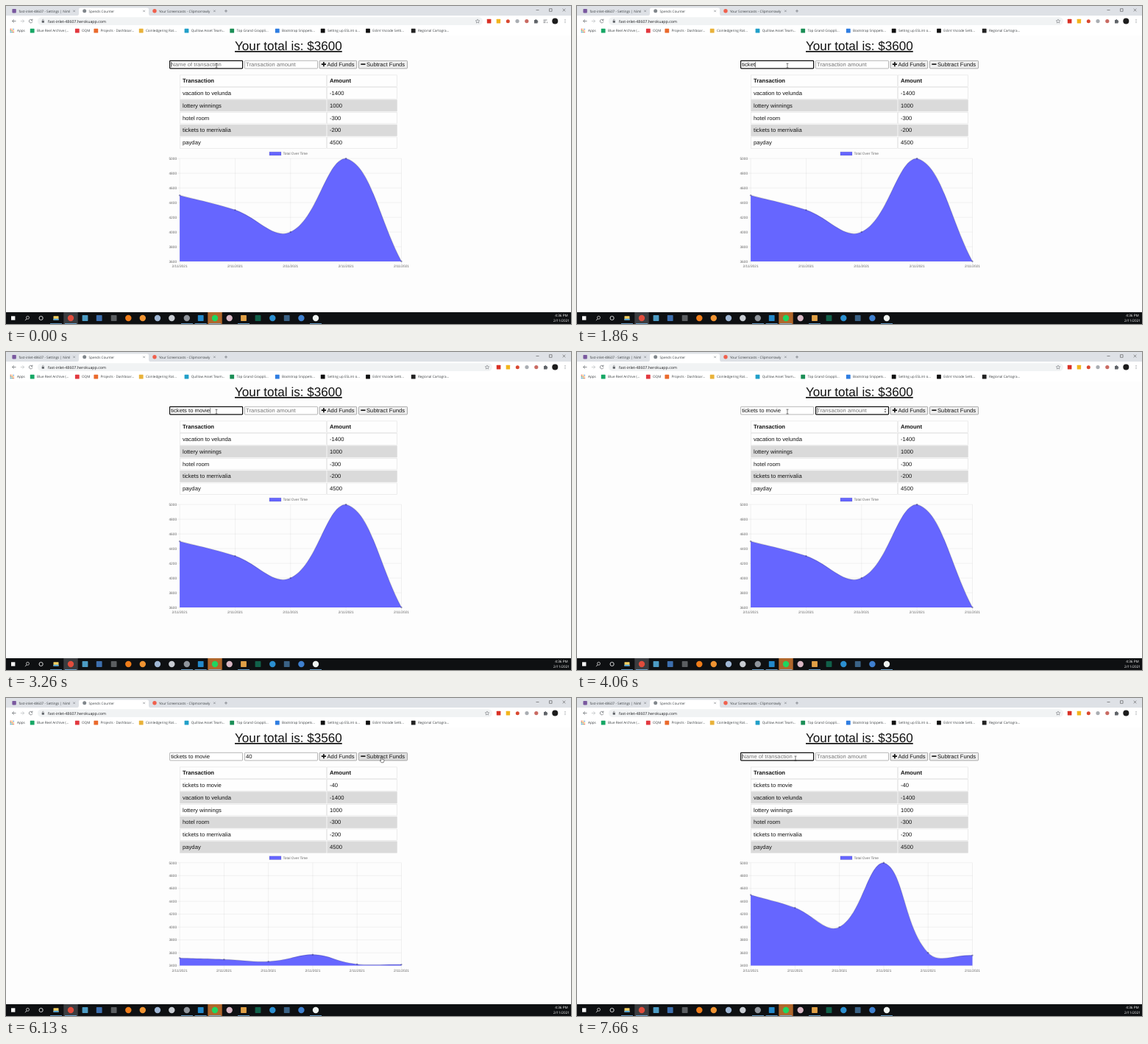
Animation, 768 px wide and 432 px high, one loop 8000 ms. Source, as an HTML page:

```html
<!DOCTYPE html>
<html lang="en">
<head>
<meta charset="utf-8">
<title>Spends Counter</title>
<style>
  html, body { margin: 0; width: 100%; height: 100%; overflow: hidden; background: #fdfdfd; }
  svg { display: block; width: 768px; height: 432px; }
  text { font: 7.68px "Liberation Sans", Arial, sans-serif; white-space: pre; text-rendering: geometricPrecision; fill: #151515; }
  .ui text { font: 4.65px "Open Sans", "Noto Sans", sans-serif; fill: #3c4043; }
  .ui .url { font-size: 5.3px; fill: #202124; }
  .ui .clock { fill: #fff; text-anchor: middle; }
  .title { font-size: 17.1px; text-anchor: middle; text-decoration: underline; fill: #111; }
  .head { font-weight: bold; }
  .chart text { font-size: 4.8px; fill: #666; }
  .hint { fill: #757575; }
</style>
</head>
<body>
<svg id="stage" viewBox="0 0 768 432"></svg>
<script>
const LOOP = 8000;
const stage = document.getElementById('stage');

// ---- drawing helpers ----
function el(parent, name, attrs = {}) {
  const node = document.createElementNS('http://www.w3.org/2000/svg', name);
  for (const k in attrs) node.setAttribute(k, attrs[k]);
  return parent.appendChild(node);
}
const group = (p, cls = '') => el(p, 'g', { class: cls });
const rect = (p, x, y, width, height, fill, more) =>
  el(p, 'rect', { x, y, width, height, fill, ...more });
const dot = (p, cx, cy, r, fill, more) => el(p, 'circle', { cx, cy, r, fill, ...more });
const line = (p, d, stroke, width = 0.6, more) =>
  el(p, 'path', { d, stroke, 'stroke-width': width, fill: 'none', ...more });
function text(p, x, y, str, more) {
  const node = el(p, 'text', { x, y, ...more });
  node.textContent = str;
  return node;
}
const show = (node, on) => node.setAttribute('visibility', on ? 'visible' : 'hidden');
const clamp = (v, lo, hi) => Math.min(hi, Math.max(lo, v));
const cross = (p, x, y, r, color) =>
  line(p, `M${x - r} ${y - r}l${2 * r} ${2 * r}m0 ${-2 * r}l${-2 * r} ${2 * r}`, color, 0.5);

// ---- browser window ----
const browser = group(stage, 'ui');
rect(browser, 0, 0, 768, 13.2, '#dee1e6');
rect(browser, 0, 13.2, 768, 27.3, '#fff');
el(browser, 'path', { d: 'M96 13.2q3 0 3-3V5q0-2.4 2.6-2.4h89.800q2.600 0 2.600 2.400v5.200q0 3 3 3z', fill: '#fff' });

rect(browser, 8.4, 4, 5.4, 5.4, '#79589f', { rx: 0.8 });
text(browser, 17.5, 8.5, 'fast-inlet-48607 - Settings | Nimb');
rect(browser, 87, 3, 3, 8, '#dee1e6');
dot(browser, 106.7, 6.8, 2.5, '#80868b');
text(browser, 112.5, 8.5, 'Spends Counter');
dot(browser, 202, 6.8, 2.7, '#f0604d');
text(browser, 208, 8.5, 'Your Screencasts - Clipmorrowly');
for (const x of [92.6, 187.6, 283.4]) cross(browser, x, 6.8, 1.3, '#5f6368');
line(browser, 'M297 6.800h4M299 4.800v4', '#5f6368');
line(browser, 'M720.500 5.500h4M738.500 3.700h3.600v3.600h-3.600z', '#333', 0.5);
cross(browser, 758.500, 5.500, 1.800, '#333');

line(browser, 'M13.500 20.500H8.700m2.200-2.300l-2.300 2.300 2.300 2.300', '#5f6368', 0.7);
line(browser, 'M19.800 20.500h4.800m-2.200-2.300l2.300 2.300-2.300 2.300', '#b8babd', 0.7);
line(browser, 'M35.500 19.200a2.300 2.300 0 1 0 .4 1.900M35.900 17.600v1.900h-1.900', '#5f6368', 0.7);

const pill = rect(browser, 43, 15.3, 618, 10.6, '#f1f3f4', { rx: 5.3 });
rect(browser, 48.7, 20, 3.2, 2.7, '#5f6368', { rx: 0.4 });
line(browser, 'M49.400 20v-.9a.9.9 0 0 1 1.800 0v.9', '#5f6368', 0.5);
text(browser, 57, 22.5, 'fast-inlet-48607.herokuapp.com', { class: 'url' });

const tools = group(browser);
line(tools, 'M654 17.900l.8 1.800 2 .2-1.500 1.300.4 1.900-1.700-1-1.700 1 .4-1.900-1.500-1.300 2-.2z', '#5f6368', 0.5);
rect(tools, 666.800, 17.800, 5.600, 5.600, '#d93025', { rx: 0.5 });
rect(tools, 679.700, 17.800, 5.400, 5.600, '#f2b51d', { rx: 0.5 });
dot(tools, 695.300, 20.800, 2.500, '#d9472f');
dot(tools, 708, 20.600, 2.600, '#a9adb2');
dot(tools, 720.800, 20.600, 2.600, '#c96a62');
el(tools, 'path', { d: 'M731 19h1.400a.9.9 0 1 1 1.800 0h1.300v1.400a.9.900 0 1 1 0 1.800v1.300H731z', fill: '#5f6368' });
const mediaButton = line(browser, 'M730.500 19h5m-5 1.800h3m-3 1.800h3m2-1v1.600', '#5f6368', 0.7);
dot(browser, 746.300, 20.600, 4, '#1c1c1c');
for (const y of [18.600, 20.600, 22.600]) dot(browser, 760, y, 0.500, '#5f6368');

for (let i = 0; i < 9; i++)
  rect(browser, 5.6 + (i % 3) * 2, 30.9 + Math.floor(i / 3) * 2, 1.3, 1.3,
    ['#e0483b', '#31a350', '#4285f4', '#f3b72e'][(i * 3) % 4]);
text(browser, 15, 35.3, 'Apps');
const bookmarks = [
  [35.7, '#16a765', 'Blue Reel Archive (...'],
  [96.800, '#e2383f', 'OQM'],
  [122.300, '#ea6a2c', 'Projects · Dashboar...'],
  [183.700, '#e9b23a', 'Coinledgering Rat...'],
  [245.500, '#22a0c9', 'Quillow Asset Team...'],
  [307.200, '#1b8e56', 'Top Grand Grappli...'],
  [368.800, '#2f7de1', 'Bootstrap Snippets...'],
  [430.700, '#111', 'Setting up ESLint o...'],
  [492, '#111', 'Eslint Vscode Setti...'],
  [553.700, '#222', 'Regional Cartogra...']
];
for (const [x, color, label] of bookmarks) {
  rect(browser, x - 2.900, 30.800, 5.800, 5.800, color, { rx: 0.6 });
  text(browser, x + 6.200, 35.300, label);
}

// ---- taskbar ----
const bar = group(stage, 'ui');
rect(bar, 0, 416, 768, 16, '#0e1012');
rect(bar, 78.300, 416, 19.400, 16, '#3b3d40');
rect(bar, 274.300, 416, 19.400, 16, '#b0672c');
rect(bar, 7, 421.300, 5.400, 5.400, '#f4f4f4');
line(bar, 'M28 425l-2 2.200', '#eee', 0.8);
dot(bar, 29.500, 423.300, 2, 'none', { stroke: '#eee', 'stroke-width': 0.7 });
dot(bar, 47.600, 424, 2.600, 'none', { stroke: '#eee', 'stroke-width': 0.900 });
rect(bar, 64.500, 421.300, 7, 5.600, '#f5cf62', { rx: 0.500 });
rect(bar, 64.500, 424.800, 7, 2.100, '#4a9fd8');
const apps = [
  [88, '#e04c3c', 1], [107.500, '#4d9cc4'], [126.700, '#3d6fae'], [146.600, '#5b5e61'],
  [166.300, '#ef7d1a', 1], [185.800, '#f09432', 1], [206, '#9fb6d4', 1], [225.300, '#c8ccd2', 1],
  [245.800, '#8f959c', 1], [264.700, '#2489ca'], [284, '#1ed760', 1], [303.700, '#d9b7c4', 1],
  [323, '#e0a046'], [342.500, '#11614a'], [362.300, '#2b8fd0', 1], [381.700, '#3a6285'],
  [401.400, '#3f80cf', 1], [421, '#eef3f0', 1]
];
for (const [x, color, round] of apps) {
  if (round) dot(bar, x, 424, 4.200, color);
  else rect(bar, x - 3.900, 420.100, 7.800, 7.800, color, { rx: 0.600 });
}
for (const x of [68, 88, 246, 264.700, 284, 323, 421]) rect(bar, x - 8, 431.200, 16, 0.800, '#76b9ed');
text(bar, 755, 422, '4:36 PM', { class: 'clock' });
text(bar, 755, 429.200, '2/11/2021', { class: 'clock' });

// ---- page: total, table and chart ----
const LEFT = 236.1, RIGHT = 537.5, HEIGHT = 139.8, ROW = 16.82;

function splinePath(pts, top, base) {
  const last = pts.length - 1;
  const ctrl = pts.map((c, i) => {
    const a = pts[i - 1] || c, b = pts[i + 1] || c;
    const d1 = Math.hypot(c[0] - a[0], c[1] - a[1]), d2 = Math.hypot(b[0] - c[0], b[1] - c[1]);
    const at = k => [
      clamp(c[0] + k * (b[0] - a[0]), LEFT, RIGHT),
      clamp(c[1] + k * (b[1] - a[1]), top, base)
    ];
    return [at(-0.4 * d1 / (d1 + d2)), at(0.4 * d2 / (d1 + d2))];
  });
  return grow => {
    const at = ([x, y]) => `${x.toFixed(2)} ${(base + (y - base) * grow).toFixed(2)}`;
    let d = 'M' + at(pts[0]);
    for (let i = 0; i < last; i++)
      d += `C${at(ctrl[i][1])} ${at(ctrl[i + 1][0])} ${at(pts[i + 1])}`;
    return d;
  };
}

function makeChart(parent, totals, min, top) {
  const g = group(parent, 'chart'), base = top + HEIGHT;
  const yOf = v => base - (v - min) / (5000 - min) * HEIGHT;
  const pts = totals.map((v, i) => [LEFT + i * (RIGHT - LEFT) / (totals.length - 1), yOf(v)]);
  rect(g, 358, top - 9, 16, 4.800, '#6666ff', { stroke: 'rgba(0,0,0,.1)', 'stroke-width': 1 });
  text(g, 376.400, top - 4.900, 'Total Over Time');
  for (let v = min; v <= 5000; v += 200) {
    line(g, `M232.100 ${yOf(v)}H${RIGHT}`, 'rgba(0,0,0,.13)', 0.400);
    text(g, 232.100, yOf(v) + 1.700, v, { 'text-anchor': 'end' });
  }
  for (const [x] of pts) {
    line(g, `M${x} ${top}V${base + 4}`, 'rgba(0,0,0,.13)', 0.400);
    text(g, x, base + 8, '2/11/2021', { 'text-anchor': 'middle' });
  }
  const path = splinePath(pts, top, base);
  const area = el(g, 'path', { fill: '#6666ff' });
  const edge = line(g, '', 'rgba(0,0,0,.14)', 1.200);
  const dots = pts.map(([x, y]) => dot(g, x, y, 1.200, 'rgba(30,30,110,.4)'));
  return grow => {
    const d = path(grow);
    edge.setAttribute('d', d);
    area.setAttribute('d', `${d}L${RIGHT} ${base}H${LEFT}Z`);
    dots.forEach((c, i) => c.setAttribute('cy', base + (pts[i][1] - base) * grow));
  };
}

function makePage(rows, min) {
  const g = group(stage);
  let sum = 0;
  const totals = rows.map(r => r[1]).reverse().map(v => sum += v);
  text(g, 383.900, 60, 'Your total is: $' + sum, { class: 'title' });
  [['Transaction', 'Amount'], ...rows].forEach(([name, amount], i) => {
    const y = 93.900 + i * ROW, fill = i && i % 2 === 0 ? '#dadada' : '#fefefe';
    const cell = { stroke: '#dcdcdc', 'stroke-width': 0.500 }, cls = { class: i ? '' : 'head' };
    rect(g, 236.500, y, 198.800, 15.500, fill, cell);
    rect(g, 436.700, y, 94.800, 15.500, fill, cell);
    text(g, 240, y + 10.200, name, cls);
    text(g, 440, y + 10.200, amount, cls);
  });
  const grow = makeChart(g, totals, min, 207.200 + (rows.length - 5) * 16.600);
  return { g, grow };
}

const history = [
  ['vacation to velunda', -1400], ['lottery winnings', 1000], ['hotel room', -300],
  ['tickets to merrivalia', -200], ['payday', 4500]
];
const before = makePage(history, 3600);
const after = makePage([['tickets to movie', -40], ...history], 3400);
before.grow(1);

// ---- form ----
const form = group(stage);
function makeInput(x, hint) {
  const box = rect(form, x, 74.300, 99, 10.600, '#fff', { rx: 0.800 });
  const value = text(form, x + 1.600, 82.100, '');
  return (str, focused, caretOn) => {
    box.setAttribute('stroke', focused ? '#101010' : '#858585');
    box.setAttribute('stroke-width', focused ? 1.200 : 0.600);
    value.textContent = str || hint;
    value.setAttribute('class', str ? '' : 'hint');
    if (!focused) return;
    const end = x + 1.600 + (str ? value.getComputedTextLength() : 0);
    caret.setAttribute('x', end);
    show(caret, caretOn);
  };
}
function makeButton(x, w, label, icon) {
  const box = rect(form, x, 74.300, w, 10.600, '#efefef', { rx: 1, stroke: '#767676', 'stroke-width': 0.600 });
  line(form, icon, '#111', 1.600);
  text(form, x + 10.500, 82.100, label);
  return box;
}
const nameInput = makeInput(222.600, 'Name of transaction');
const amountInput = makeInput(324.500, 'Transaction amount');
makeButton(426, 50.700, 'Add Funds', 'M428.800 79.100h6.200m-3.100-3.100v6.200');
const subtract = makeButton(479.500, 66, 'Subtract Funds', 'M482.300 79.100h6.200');
const spinner = el(form, 'path', { d: 'M417.600 78.600l1.400-1.800 1.400 1.800zM417.600 80.600l1.400 1.800 1.400-1.800z', fill: '#444' });
const caret = rect(form, 0, 75.800, 0.500, 7.600, '#000');

// ---- pointer ----
const pointers = {
  text: line(stage, 'M-1.500-3H1.500M0-3V3M-1.500 3H1.500', '#222', 0.600),
  hand: el(stage, 'path', { d: 'M-.7.300Q0-.500.700.300V2.700L3.400 3.300V5.200L2.600 7.200H-.400L-2.300 4.600-1.600 4-.700 4.700Z',
    fill: '#fff', stroke: '#111', 'stroke-width': 0.500 }),
  arrow: el(stage, 'path', { d: 'M0 0V6.200L1.400 4.900 2.400 7.100 3.300 6.700 2.300 4.600H4.300Z',
    fill: '#fff', stroke: '#111', 'stroke-width': 0.450 })
};

// ---- timeline ----
const NAME = 'tickets to movie';
const nameKeys = [...NAME].map((_, i) => i < 6 ? 1330 + i * 104 : 1960 + (i - 6) * 122);
const amountKeys = [4460, 4660];
const TAB = 3930, CLICK = 6060, SAVED = 6103, CLEARED = 6900, REFOCUS = 7600;
const moves = [
  [0, 286, 81], [5080, 286, 81], [5200, 293, 75.500], [5900, 510.500, 80.500],
  [6230, 510.500, 80.500], [6740, 365.500, 197.300], [6860, 365.500, 197.300], [7460, 297, 82]
];

function pointerAt(t) {
  const i = moves.findIndex(m => m[0] > t);
  if (i < 0) return moves[moves.length - 1].slice(1);
  const [t0, x0, y0] = moves[i - 1], [t1, x1, y1] = moves[i];
  const p = (t - t0) / (t1 - t0), e = p * p * (3 - 2 * p);
  return [x0 + (x1 - x0) * e, y0 + (y1 - y0) * e];
}
function pointerKind(x, y) {
  if (y < 74 || y > 85) return 'arrow';
  if (x > 222 && x < 424) return 'text';
  return x > 426 && x < 546 ? 'hand' : 'arrow';
}

function render(t) {
  // toolbar icons close the gap left by the media button
  const slide = clamp((t - 60) / 340, 0, 1), gap = 13 * (1 - slide) ** 2;
  tools.setAttribute('transform', `translate(${-gap} 0)`);
  pill.setAttribute('width', 618 - gap);
  mediaButton.setAttribute('opacity', clamp(1 - slide * 3, 0, 1));

  const saved = t >= SAVED;
  before.g.style.display = saved ? 'none' : '';
  after.g.style.display = saved ? '' : 'none';
  if (saved) after.grow(1 - (1 - clamp((t - SAVED) / 1000, 0, 1)) ** 4);

  const count = keys => t < CLEARED ? keys.filter(k => k <= t).length : 0;
  const onName = t < TAB || t >= REFOCUS, onAmount = t >= TAB && t < CLICK;
  const lastKey = [860, ...nameKeys, TAB, ...amountKeys, REFOCUS].filter(k => k <= t).pop() ?? -200;
  const caretOn = Math.floor((t - lastKey) / 530) % 2 === 0;
  show(caret, false);
  nameInput(NAME.slice(0, count(nameKeys)), onName, caretOn);
  amountInput('40'.slice(0, count(amountKeys)), onAmount, caretOn);
  show(spinner, onAmount);

  const [x, y] = pointerAt(t), kind = pointerKind(x, y);
  for (const k in pointers) show(pointers[k], k === kind);
  pointers[kind].setAttribute('transform', `translate(${x} ${y})`);
  subtract.setAttribute('fill', kind === 'hand' && x > 479 ? '#dedede' : '#efefef');
}

const start = performance.now();
function tick() {
  render((performance.now() - start) % LOOP);
  requestAnimationFrame(tick);
}
tick();
</script>
</body>
</html>
```
